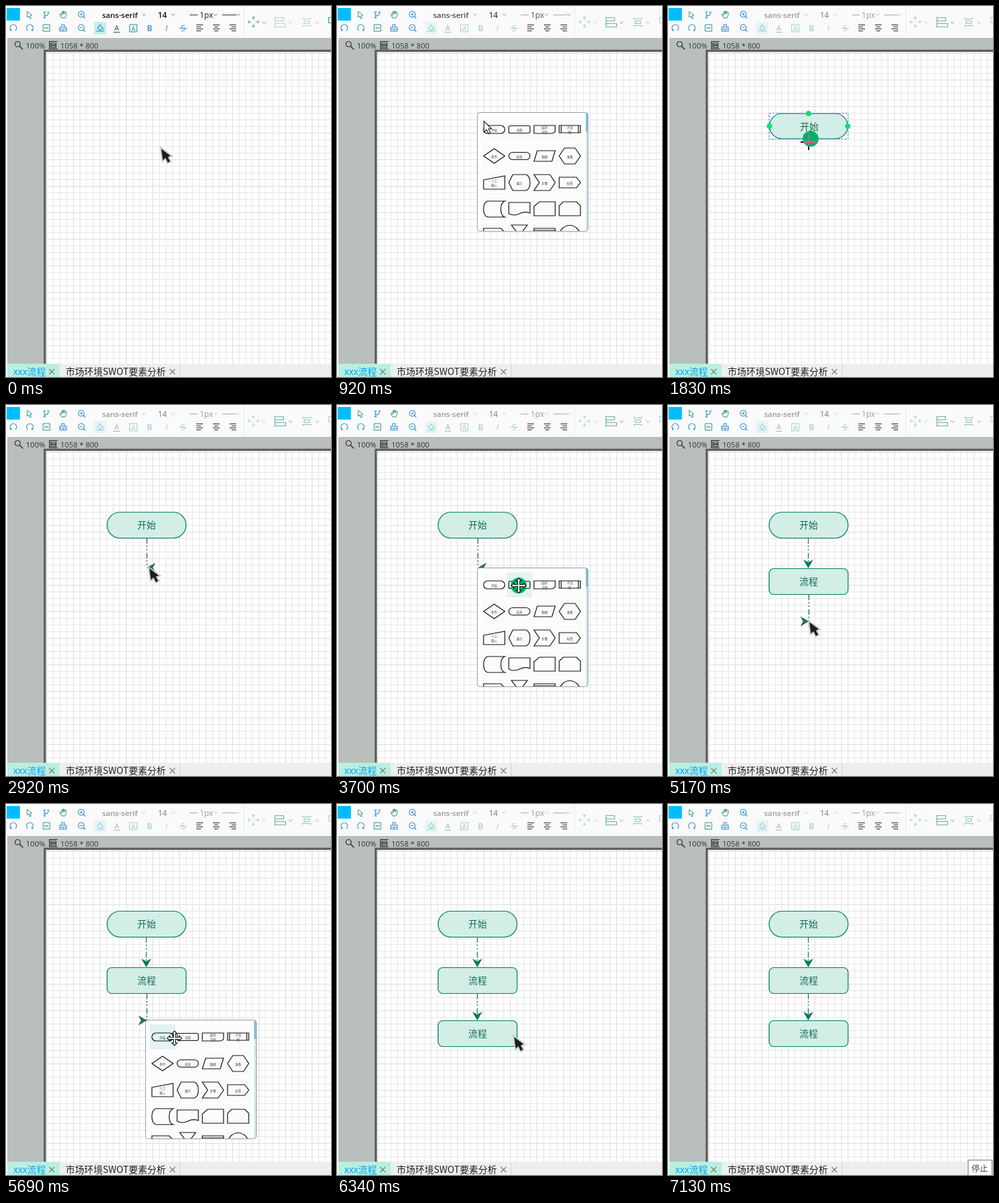
Animation, 490 px wide and 559 px high, one loop 7.27 s. Source, as an HTML page with a canvas:

```html
<!DOCTYPE html>
<html lang="zh-CN">
<head>
<meta charset="utf-8">
<title>流程图编辑</title>
<style>
html, body { margin: 0; width: 100%; height: 100%; overflow: hidden; background: #fff; }
canvas { display: block; }
</style>
</head>
<body>
<canvas id="stage" width="490" height="559"></canvas>
<script>
const ctx = document.getElementById('stage').getContext('2d');
const LATIN = '"Open Sans", "Noto Sans", sans-serif';
const CJK = '"Noto Sans CJK SC", "Noto Sans CJK", "Noto Sans CJK JP", sans-serif';
const BLUE = '#2f8fd0', TEAL = '#2b8f87', GREEN = '#007f60';

const LOOP = 7270, TICK = 130;
const longer = { 3: 10, 14: 40, 18: 10, 29: 10, 33: 20, 35: 10, 48: 10, 54: 10 };
function stepAt(ms) {
  let step = 0, end = 0;
  while ((end += TICK + (longer[step] || 0)) <= ms) step++;
  return step;
}

// Pointer stops: step, x, y, kind, press-halo offset.
const pointerStops = [
  [0, 233, 214, 'dark'], [2, 211, 160, 'dark', [0, 0]], [5, 211, 160, 'arrow'],
  [7, 221, 173, 'arrow'], [9, 232, 184, 'move'], [11, 236, 187, 'move', [0, 0]],
  [12, 232, 188, 'dark'], [14, 212, 205, 'cross', [3, -5]], [18, 212, 212, 'cross', [1, -1]],
  [21, 213, 244, 'cross', [0, 0]], [22, 215, 245, 'dark'], [23, 215, 248, 'arrow'],
  [25, 235, 265, 'move'], [27, 272, 272, 'move'], [28, 274, 272, 'move', [0, 0]],
  [29, 268, 290, 'dark'], [30, 262, 325, 'dark'], [32, 230, 300, 'dark'],
  [34, 206, 283, 'cross', [0, 2]], [35, 211, 287, 'cross', [0, 0]],
  [38, 212, 325, 'cross', [0, 0]], [39, 212, 326, 'dark'], [40, 214, 329, 'arrow'],
  [42, 236, 350, 'move'], [43, 254, 353, 'move'], [45, 273, 352, 'move'],
  [46, 273, 352, 'move', [0, 0]], [47, 268, 351, 'dark'], [48, 266, 350, 'dark'],
  [53, 478, 552, 'none']
];
function pointerAt(step) {
  const i = pointerStops.findLastIndex(stop => stop[0] <= step);
  const a = pointerStops[i], b = pointerStops[i + 1] || a;
  const part = b === a ? 0 : (step - a[0]) / (b[0] - a[0]);
  return { x: a[1] + (b[1] - a[1]) * part, y: a[2] + (b[2] - a[2]) * part, kind: a[3], halo: a[4] };
}

function rect(x, y, w, h, fill) {
  ctx.fillStyle = fill;
  ctx.fillRect(x, y, w, h);
}
function shape(path, x, y, stroke, width = 1, fill) {
  const p = typeof path === 'string' ? new Path2D(path) : path;
  ctx.save();
  ctx.translate(x, y);
  if (fill) { ctx.fillStyle = fill; ctx.fill(p); }
  if (stroke) { ctx.strokeStyle = stroke; ctx.lineWidth = width; ctx.stroke(p); }
  ctx.restore();
}
function box(halfW, halfH, radius = 0) {
  const p = new Path2D();
  p.roundRect(-halfW, -halfH, halfW * 2, halfH * 2, radius);
  return p;
}
function dot(x, y, radius, fill) {
  shape(box(radius, radius, radius), x, y, null, 0, fill);
}
function text(str, x, y, size, color, { font = LATIN, weight = '400', align = 'left' } = {}) {
  ctx.font = `${weight} ${size}px ${font}`;
  ctx.textAlign = align;
  ctx.fillStyle = color;
  ctx.fillText(str, x, y);
}
function faded(alpha, draw) {
  ctx.save();
  ctx.globalAlpha = alpha;
  draw();
  ctx.restore();
}
const chevron = (x, y, color = '#888') => shape('M-2.5-1.5L0 1.5 2.5-1.5', x, y, color);

function drawToolbar(step) {
  rect(0, 0, 490, 45, '#fafafa');
  rect(0, 45, 490, 1, '#eeeeee');
  rect(358, 0, 1, 45, '#e8e8e8');
  const iconAlpha = step < 5 ? 1 : step < 6 ? 0.7 : 0.42;
  const textAlpha = step < 5 ? 1 : step < 8 ? 0.75 : step < 10 ? 0.6 : 0.42;

  rect(1, 3, 20, 19, '#00bfff');
  ctx.setLineDash([1, 1]);
  shape('M-3-4H3L5 0 3 4H-3L-5 0z', 11, 13, '#1590d8');
  ctx.setLineDash([]);
  shape('M-3-5L4 1 1 2 3 5 1 6-1 2-3 4z', 35, 13, TEAL);
  shape('M-3-4V5M-3 2Q3 2 3-3M-5-4H-1M1-4H5M-5 5H-1', 61, 13, BLUE, 1.2);
  shape('M-5 0L-2 5H3Q5 2 5-3M-5 0L-3-1-2 1V-4Q-1-6 0-4V-1-5Q1-6 2-4V-1-4Q4-5 5-3', 86, 13, TEAL);
  for (const [y, sign] of [[13, 'M-2 0H2M0-2V2'], [33, 'M-2 0H2']]) {
    shape(box(4.5, 4.5, 4.5), 113.5, y - 0.5, BLUE, 1.1);
    shape(sign, 113.5, y - 0.5, BLUE);
    shape('M3 3L6 6', 113.5, y - 0.5, BLUE, 1.2);
  }
  shape('M-3 4A5 5 0 1 1 3 4M-5 4H-3V2', 11, 33, BLUE, 1.1);
  shape('M-3 4A5 5 0 1 1 3 4M5 4H3V2', 36, 33, BLUE, 1.1);
  shape(box(5, 5), 61, 33, TEAL);
  shape('M-3 0H3', 61, 33, TEAL, 1.2);
  shape('M-5-1H5V5H-5zM-2-1V-5H2V-1M-5 2H5M0 2V5', 86, 33, BLUE, 1.1);

  faded(iconAlpha, () => {
    rect(133, 24, 18, 19, '#c5efe6');
    shape('M-4 0L0-4 4 0 0 4zM-1-5L1-3M-6 5H6M5 1V3', 142, 33, BLUE, 1.1);
    text('A', 167, 37, 11, '#11605c', { align: 'center' });
    rect(162, 39, 10, 1, '#11605c');
    shape(box(5.5, 5.5), 192, 33.5, TEAL);
    text('A', 192, 37.5, 10, TEAL, { align: 'center' });
    text('B', 216.5, 38, 12, BLUE, { align: 'center', weight: '600' });
    text('I', 242, 38, 12, BLUE, { align: 'center', weight: 'italic 400' });
    text('S', 267, 38, 12, BLUE, { align: 'center' });
    rect(261, 33, 12, 1, BLUE);
    rect(277, 13, 12, 1, '#333');
    rect(326, 13, 21, 1, '#333');
  });
  faded(textAlpha, () => {
    text('sans-serif', 145, 18, 11.5, '#111', { weight: '600' });
    text('14', 229, 18, 11.8, '#111', { weight: '600' });
    text('1px', 292, 18, 12, '#222');
    for (const x of [208, 252, 316, 350]) chevron(x, 13);
  });
  ['M-5-4.5H5M-5-1.5H2M-5 1.5H5M-5 4.5H2', 'M-5-4.5H5M-3-1.5H3M-5 1.5H5M-3 4.5H3',
   'M-5-4.5H5M-2-1.5H5M-5 1.5H5M-2 4.5H5'].forEach((d, i) => shape(d, 292 + i * 25, 33, '#222', 1));

  const dim = step >= 5;
  faded(dim ? 0.35 : 0.7, () => {
    shape('M0-8V-3M0 3V8M-8 0H-3M3 0H8M-2-6L0-8 2-6M-2 6L0 8 2 6M-6-2L-8 0-6 2M6-2L8 0 6 2', 373, 24, '#2e9a7c', 1.2);
    chevron(389, 25, BLUE);
  });
  faded(dim ? 0.8 : 0.4, () => {
    shape('M-8-8V8M-8-7H5V-2H-8M-8 2H8V7H-8', 413.5, 24.5, '#4f9f93', 1.2);
    chevron(429, 25);
  });
  faded(dim ? 0.6 : 0.4, () => {
    shape('M-6-7V-5H6V-7M-6 7V5H6V7M-4-2H4V2H-4z', 453.5, 24.5, '#4f9f93', 1.1);
    chevron(469, 25);
  });
  faded(dim ? 0.4 : 1, () => shape('M4-4H-3V4H4', 489.5, 21.5, BLUE, 1.1));
}

function drawWorkspace() {
  rect(2, 48, 488, 491, '#b8bfbc');
  shape(box(4, 4, 4), 17.5, 57.5, '#333', 1.2);
  shape('M3 3L8 8', 17.5, 57.5, '#333', 1.6);
  text('100%', 30, 63.5, 11.5, '#333');
  shape('M-6-5.5H6M-6 5.5H6M-4-3H4V-.5H-4zM-4 1H4V3.5H-4zM-6-6V6', 71.5, 59, '#222', 1.1);
  text('1058 * 800', 82, 63.5, 11.3, '#333');
  ['#a0a6a4', '#6c706e', '#4d4f4e', '#6a6c6b', '#d4d4d4'].forEach((c, i) => rect(56 + i, 65 + i, 434, 474 - i, c));
  rect(61, 70, 429, 469, '#fff');
  for (let n = 0; n < 47; n++) {
    const color = n % 4 ? '#e6e6e6' : '#dcdcdc';
    if (n < 43) rect(61 + n * 10, 70, 1, 469, color);
    rect(61, 71 + n * 10, 429, 1, color);
  }
}

function drawTabs(step) {
  rect(0, 539, 490, 20, '#eeeeee');
  rect(0, 539, 2, 20, '#fff');
  rect(2, 539, 79, 20, '#b9efe0');
  rect(262, 540, 1, 19, '#d4d4d4');
  text('xxx流程', 11, 555.5, 14, '#00a2f8', { font: CJK, weight: '500' });
  text('市场环境SWOT要素分析', 90, 555.5, 14, '#222', { font: CJK });
  for (const x of [69, 251]) shape('M-4-4L4 4M4-4L-4 4', x, 551, '#777', 1.1);
  if (step >= 53) {
    rect(452, 536, 37, 23, '#777');
    rect(453, 537, 35, 22, '#fff');
    text('停止', 457.5, 554, 12.5, '#444', { font: CJK });
  }
}

const nodes = [
  { label: '开始', y: 181, radius: 20, from: 12, active: [13, 18], rows: [0] },
  { label: '流程', y: 266, radius: 7, from: 29, active: [32, 35], rows: [-1, 0, 1] },
  { label: '流程', y: 346, radius: 7, from: 47, active: [47, 47], rows: [-1, 0, 1] }
];
function drawNode({ label, y, radius, from, active, rows }, step) {
  if (step < from) return;
  const hot = step >= active[0] && step <= active[1];
  const inset = hot ? 0.5 : 0;
  shape(box(59.5 - inset, 19.5 - inset, radius), 212, y, hot ? '#1d6a5e' : GREEN, 1.2, '#d2eee6');
  text(label, 212 + hot, y + 5 + hot, 14, '#176a55', { font: CJK, align: 'center' });
  if (!hot) return;
  ctx.setLineDash([3, 2]);
  shape(box(59.5, 19.5), 212, y, '#0a9fee');
  ctx.setLineDash([]);
  for (const row of rows)
    for (const col of [-1, 1]) dot(212 + col * 59, y + row * 19, 4, '#00e272');
  for (const row of [-1, 1]) dot(212, y + row * 19, 4, '#00e272');
}

const DOWN = Math.PI / 2;
function drawLink(top, bottom, angle, preview = true) {
  const x = preview ? 212.5 : 211.5;
  ctx.setLineDash([8, 3, 2, 3, 2, 4]);
  shape(`M0 0V${Math.max(0, bottom - top - (angle === DOWN ? 9 : 0))}`, x, top, '#00694f', 1.1);
  ctx.setLineDash([]);
  ctx.save();
  ctx.translate(x, bottom);
  ctx.rotate(angle);
  shape('M0 0L-13-7.5-9 0-13 7.5z', 0, 0, null, 0, preview ? '#2c6e5e' : '#007a5a');
  ctx.restore();
}
function drawLinks(step, pointer) {
  if (step >= 29) drawLink(201, 246, DOWN, false);
  else if (step >= 22) drawLink(201, 245, Math.PI);
  else if (step >= 19) drawLink(201, pointer.y, DOWN);
  if (step >= 47) drawLink(286, 326, DOWN, false);
  else if (step >= 39) drawLink(286, 326, 0);
  else if (step >= 36) drawLink(286, pointer.y, DOWN);
  if (step === 34 || step === 35) rect(212, 247, 1, 27, '#2c9fe0');
}

const palette = [
  [box(16, 6, 6), '开始'], [box(16, 5.5, 2), '流程'],
  ['M-16-6H16V3Q14 6 10 6H-16z', '临时|流程'], ['M-16-6H16V5H-16zM-13-6V5M13-6V5', '子流|程'],
  ['M0-11L16 0 0 11-16 0z', '条件'], [box(16, 5.5, 5.5), '结束'],
  ['M-11-8H16L11 8H-16z', '数据'], ['M-8-12H8L16 0 8 12H-8L-16 0z', '准备'],
  ['M-16-4L16-10V10H-16z', '人工|输入'], ['M-10-12H10Q16-10 16 0T10 12H-10L-16 0z', '展示'],
  ['M-16-12H8L16 0 8 12H-16L-8 0z', '步骤'], ['M-16-8H10L16 0 10 8H-16z', '标签'],
  ['M-10-12H16Q10-10 10 0T16 12H-10Q-16 10-16 0T-10-12z'], ['M-16-10H16V6Q8 3 0 7T-16 7z'],
  ['M-8-11H16V10H-16V-4z'], ['M-10-11H10L16-5V10H-16V-5z'],
  ['M-16-11H10L16-5V11H-16z'], ['M-12-16H12L0 0z'],
  ['M-16-11H16V11H-16zM-16-8H16'], [box(15.5, 15.5, 15.5)]
];
const popups = [
  { from: 5, to: 11, x: 211, y: 160 },
  { from: 23, to: 28, x: 211, y: 245 },
  { from: 40, to: 46, x: 210, y: 325 }
];
function drawPopup({ x, y }, pointer) {
  ctx.save();
  ctx.translate(x, y);
  const frame = new Path2D();
  frame.roundRect(0.5, 0.5, 167, 179, 4);
  ctx.fillStyle = '#fff';
  ctx.fill(frame);
  ctx.save();
  ctx.clip(frame);
  palette.forEach(([path, label], i) => {
    const cx = 26 + (i % 4) * 38, cy = 26 + Math.floor(i / 4) * 40;
    const hovered = pointer.kind === 'move' &&
      Math.abs(pointer.x - x - cx) <= 19 && Math.abs(pointer.y - y - cy) < 19;
    rect(cx - 19, cy - 19, 38, 38, hovered ? '#e3f2f5' : '#fbfbfb');
    shape(path, cx, cy, '#111', 1.2);
    const lines = label ? label.split('|') : [];
    lines.forEach((line, n) =>
      text(line, cx, cy + 2.5 + (n - (lines.length - 1) / 2) * 7, 4.6, '#2d5560', { font: CJK, align: 'center' }));
  });
  rect(164, 0, 4, 180, '#d3e9ee');
  rect(164, 1, 4, 28, '#86bfe2');
  ctx.restore();
  ctx.strokeStyle = '#93a0a6';
  ctx.lineWidth = 1;
  ctx.stroke(frame);
  ctx.restore();
}

const pointerShapes = {
  dark(x, y) {
    const arrow = 'M1 1L3.5 18.5 7.5 15 11 22 14.5 20 11 13.5 15.5 12z';
    shape(arrow, x, y, '#b4b4b4', 3.4);
    shape(arrow, x, y, '#e8e8e8', 1.8);
    shape(arrow, x, y, null, 0, '#1c1f22');
  },
  arrow(x, y) {
    shape('M.5 .5V17L4.5 13.5 7.5 19.5 10 18 7.5 12H12z', x, y, '#111', 1.1, '#fff');
  },
  move(x, y) {
    shape('M0-11L4-7H1.5V-1.5H7V-4L11 0 7 4V1.5H1.5V7H4L0 11-4 7H-1.5V1.5H-7V4L-11 0-7-4V-1.5H-1.5V-7H-4z',
      x, y, '#111', 1.1, '#fff');
  },
  cross(x, y) {
    ctx.save();
    ctx.globalCompositeOperation = 'difference';
    shape('M-12 0H12M0-11V12', Math.round(x), Math.round(y), '#fff', 2);
    ctx.restore();
  },
  none() {}
};

function render(now) {
  const step = stepAt(now % LOOP);
  const pointer = pointerAt(step);
  rect(0, 0, 490, 559, '#fff');
  drawToolbar(step);
  drawWorkspace();
  nodes.forEach(node => drawNode(node, step));
  drawLinks(step, pointer);
  const popup = popups.find(p => step >= p.from && step <= p.to);
  if (popup) drawPopup(popup, pointer);
  drawTabs(step);
  if (pointer.halo) dot(pointer.x + pointer.halo[0], pointer.y + pointer.halo[1], 12, '#00b068');
  pointerShapes[pointer.kind](pointer.x, pointer.y);
}

const start = performance.now();
function tick() {
  render(performance.now() - start);
  requestAnimationFrame(tick);
}
tick();
</script>
</body>
</html>
```
